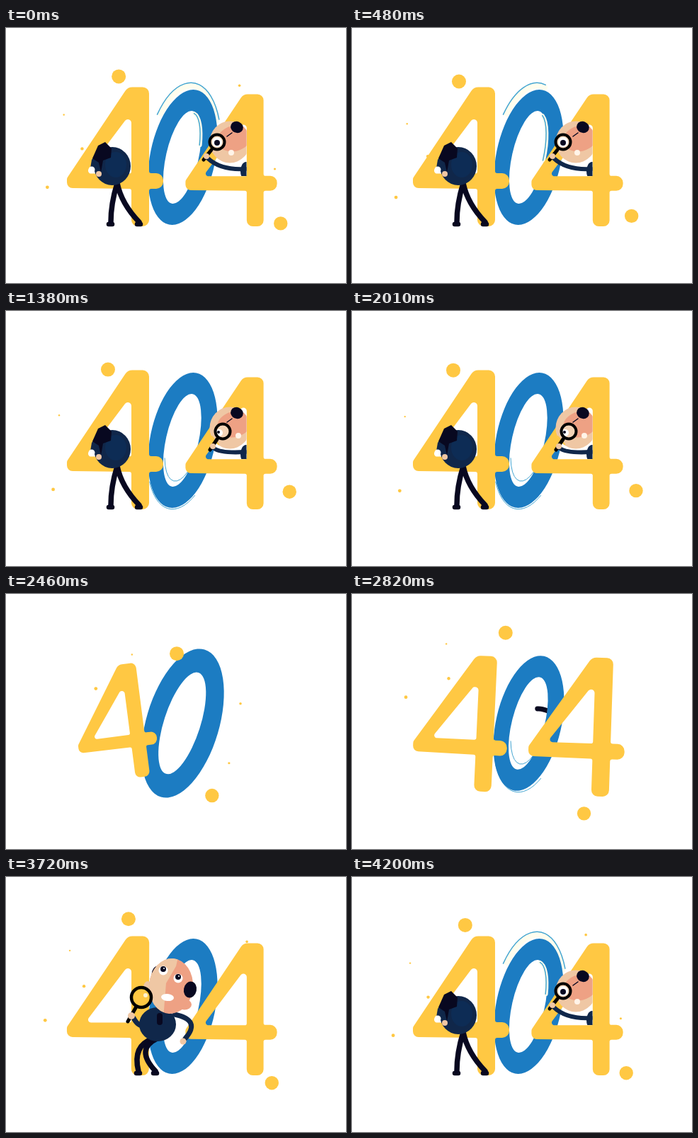
Recreate the animation shown at these times as an HTML page with a canvas. Size 480 px wide and 360 px high, loop 4230 ms.

```html
<!DOCTYPE html>
<html lang="en">
<head>
<meta charset="utf-8">
<title>404</title>
<style>
html, body { margin: 0; width: 100%; height: 100%; overflow: hidden; background: #fff; }
canvas { display: block; }
</style>
</head>
<body>
<canvas id="stage" width="480" height="360"></canvas>
<script>
const c = document.getElementById('stage').getContext('2d');
const LOOP = 4230, START = 2130;
const YELLOW = '#ffc843', BLUE = '#1c7cc2', NAVY = '#10274a', DARK = '#080820',
      PALE = '#efc7a4', SALMON = '#eea184', GLINT = '#45a6d2', CREAM = '#fffdee';

const clamp = v => Math.min(1, Math.max(0, v));
const mix = (a, b, p) => a + (b - a) * p;
const ease = (u, a, b) => { const p = clamp((u - a) / (b - a)); return p * p * (3 - 2 * p); };

function oval(x, y, rx, ry, color, turn = 0) {
  c.fillStyle = color;
  c.beginPath();
  c.ellipse(x, y, rx, ry, turn, 0, 7);
  c.fill();
}
const disc = (x, y, r, color) => oval(x, y, r, r, color);

function ring(x, y, r, w, color) {
  c.strokeStyle = color;
  c.lineWidth = w;
  c.beginPath();
  c.arc(x, y, r, 0, 7);
  c.stroke();
}

function shape(color, ...pts) {
  c.fillStyle = color;
  c.beginPath();
  pts.forEach(p => c.lineTo(...p));
  c.fill();
}

// Two points give a straight line, three a curve
function line(color, w, ...p) {
  c.strokeStyle = color;
  c.lineWidth = w;
  c.beginPath();
  c.moveTo(p[0], p[1]);
  if (p.length > 4) c.quadraticCurveTo(...p.slice(2));
  else c.lineTo(p[2], p[3]);
  c.stroke();
}

function clipped(path, draw) {
  c.save();
  c.beginPath();
  path();
  c.clip();
  draw();
  c.restore();
}

// Draws around (x, y) with a springy scale and a turn that settles
function pop(u, start, x, y, size, turn, draw) {
  const t = u - start;
  if (t <= 0) return;
  c.save();
  c.translate(x, y);
  c.rotate(turn(t) * Math.exp(-t / 300));
  const s = size * (1 - Math.exp(-t / 125) * Math.cos(t * Math.PI / 240));
  c.scale(s, s);
  draw();
  c.restore();
}

function roundPoly(path, pts) {
  const end = pts[pts.length - 1];
  path.moveTo((end[0] + pts[0][0]) / 2, (end[1] + pts[0][1]) / 2);
  pts.forEach(([x, y, r], i) => {
    const [nx, ny] = pts[(i + 1) % pts.length];
    path.arcTo(x, y, nx, ny, r);
  });
  path.closePath();
}

// The digit 4, centred on its own origin
const four = new Path2D();
roundPoly(four, [[18, -98.5, 12], [48, -98.5, 9], [48, 23, 3], [68, 23, 10], [68, 45, 10],
  [48, 45, 3], [48, 98, 9], [23, 98, 9], [23, 45, 3], [-68, 44, 8], [-68, 30, 6]]);
roundPoly(four, [[23, -63, 5], [23, 23.5, 3], [-42, 23.5, 4]]);

const drawFour = (u, start, x, y, size) =>
  pop(u, start, x, y, size, t => -.21 * Math.cos(t * Math.PI / 480), () => {
    c.fillStyle = YELLOW;
    c.fill(four, 'evenodd');
  });

function glint(rx, ry, turn, from, to, color = GLINT, w = 1.5) {
  c.strokeStyle = color;
  c.lineWidth = w;
  c.beginPath();
  c.ellipse(250, 182.5, rx, ry, turn, from, to);
  c.stroke();
}

function drawZero(u) {
  const upper = u > 1600 && u < 2900;
  const lower = u > 3000 || (u > 550 && u < 1000);
  const sweep = clamp((u - 2100) / 480);
  if (upper) {
    const end = mix(-.6, -1.4, sweep);
    glint(48, 102, .14, -2.55, end, CREAM, 8);
    glint(52, 106, .14, -2.6, end);
  }
  if (lower) glint(47, 99, .2, .83, 2.4, GLINT, 1);
  pop(u, 70, 249.5, 182.5, 1, () => .21, () => {
    c.fillStyle = BLUE;
    c.beginPath();
    c.ellipse(0, 0, 46, 97, .2, 0, 7);
    c.closePath();
    c.moveTo(0, 0);
    c.ellipse(-.7, 0, 23, 67, .223, 0, 7);
    c.fill('evenodd');
  });
  if (upper) {
    const from = mix(-1.5, -1.3, sweep), to = mix(-.35, 0, sweep);
    glint(21, 64, .223, from, to, CREAM, 5);
    glint(20, 64, .223, from, to);
  }
  if (lower) glint(23, 59, .223, .6, 2.6, GLINT, 1);
}

// All dots fly out of the centre and share one slowing turn.
// Each is: degrees left of straight up, distance, radius, last moment
const bigDots = [[0, 144, 10], [-164, 168, 9.7]];
const specks = [[64, 197, 2.4], [47, 143, 2.2], [32, 178, 1.2], [-78, 127, 1.8, 2400], [-137.5, 131, 1.6, 2400]];

function drawDots(list, u) {
  if (u < 150) return;
  const turn = 48 * (1 - Math.pow(1 - (u - 150) / 4080, 2.6));
  const reach = 1 - Math.exp(-u / 300);
  for (const [angle, far, r, until = LOOP] of list) {
    if (u > until) continue;
    const a = (angle + turn) * Math.PI / 180, d = far * reach;
    disc(250 - d * Math.sin(a), 180 - d * Math.cos(a), r, YELLOW);
  }
}

function drawLegs(p) {
  const leg = (a, b) => {
    const v = a.map((n, i) => mix(n, b[i], p));
    line(DARK, 7.5, ...v);
    line(DARK, 6.5, v[4] - 3, 277, v[4] + 2, 277);
  };
  leg([208, 228, 178, 238, 187, 274], [157, 219, 148, 248, 148, 274]);
  leg([213, 228, 182, 243, 211, 274], [157, 219, 163, 248, 188, 274]);
}

function drawHead() {
  oval(200, 156, 6, 9, PALE);
  oval(213, 135, 7, 9.5, DARK, .3);
  oval(252, 180, 10, 7.5, SALMON);
  clipped(() => c.ellipse(233, 154, 31, 39, .08, 0, 7), () => {
    c.fillStyle = SALMON;
    c.fillRect(190, 100, 90, 100);
    shape(PALE, [190, 100], [246, 100], [240, 126], [226, 150], [222, 200], [190, 200]);
  });
  oval(260, 159, 9, 11.5, DARK, .2);
  for (const [x, y] of [[222, 132], [243, 143]]) {
    disc(x, y, 6.5, '#fff');
    disc(x, y - 2, 4, DARK);
    disc(x + 1, y - 3, 1, '#fff');
  }
  oval(228, 170, 9, 5, '#fff', .1);
}

function drawLens() {
  line('#000', 5, 172, 204, 184, 183);
  disc(177, 196, 5, PALE);
  disc(191, 170, 14, YELLOW);
  ring(191, 170, 14, 4.5, '#000');
  disc(197, 167, 3, '#fff3d0');
}

// p moves the figure into the left digit, its head slipping behind the stem
function drawMan(p, dx) {
  const upper = draw => clipped(() => c.rect(mix(160, 177, p), 0, 480, 360), () => {
    c.translate(-100 * p, 0);
    draw();
  });
  c.save();
  c.translate(dx, 0);
  drawLegs(p);
  if (p < 1) upper(() => {
    line(NAVY, 7, 238, 194, 276, 202, 253, 228);
    disc(250, 232, 4.5, PALE);
    line(NAVY, 7, 198, 208, 188, 214, 180, 199);
  });
  oval(mix(214, 150, p), mix(208, 195, p), 26, mix(24, 27, p), NAVY);
  if (p < 1) upper(() => {
    drawHead();
    line(DARK, 8, 217, 196, 217, 205);
    drawLens();
  });
  if (p > .85) {
    oval(155, 193, 15, 18, '#0d2c55');
    shape(NAVY, [131, 172], [140, 172], [138, 204], [119, 198], [121, 186]);
    shape(DARK, [140, 161], [149, 170], [148, 183], [137, 187], [134, 204], [131, 190], [122, 184], [130, 166]);
    disc(121, 200, 4.5, '#fff');
    disc(131, 206, 4, PALE);
  }
  c.restore();
}

// Head and lens showing through the right-hand digit
function drawPeek(u) {
  const shown = ease(u, 1780, 2040);
  if (!shown) return;
  const q = ease(u, 2650, 3200);
  clipped(() => c.rect(240, 100, 99.5, 109), () => {
    c.translate(75 * (1 - shown), 0);
    const dy = 4 * q, lx = 298 + 8 * q, ly = 161 + 9 * q;
    const hx = 283 + 9 * q, hy = 183 + 10 * q;
    oval(339, 202, 8, 13, NAVY);
    clipped(() => c.ellipse(316, 161 + dy, 28.5, 29.5, 0, 0, 7), () => {
      c.fillStyle = PALE;
      c.fillRect(280, 120, 70, 80);
      oval(322, 156 + dy, 24, 18, SALMON, -.25);
      shape(YELLOW, [280, 175], [291, 176], [301, 188], [300, 200], [280, 200]);
    });
    line(NAVY, 6, hx + 2, hy + 1, 303, 201, 338, 199);
    oval(326, 140 + dy, 9, 8, DARK, .4);
    line(DARK, 1.5, 312, 153 + dy, 319, 148 + dy);
    disc(318 + 10 * q, 176, 4, '#fff4e8');
    line('#000', 5, lx - 8, ly + 11, hx - 4, hy + 3);
    disc(hx, hy - 2, 4, PALE);
    disc(lx, ly, 10.5, '#f3d3b6');
    disc(lx - 5 * q, ly + 2 * q, 7 - 2 * q, '#fff');
    disc(lx - 6 * q, ly + 1, 4 - 2 * q, DARK);
    ring(lx, ly, 10.5, 4, '#000');
  });
}

// While entering, the figure only shows through the ring and left of it
function drawEntry(u) {
  const dx = 115 * Math.pow(1 - clamp((u - 690) / 380), 2);
  const opening = () => {
    c.ellipse(249.5, 182.5, 23, 67, .223, 0, 7);
    c.rect(0, 0, 225, 360);
  };
  clipped(dx > 0 ? opening : () => c.rect(0, 0, 480, 360), () => {
    const x = 250 + Math.abs(u - 750) * .2;
    if (u < 900) line(DARK, 7, x, 162, x + 10, 161, x + 28, 172);
    if (u > 690) drawMan(ease(u, 1600, 1950), dx);
  });
}

function frame(now) {
  const u = (now % LOOP - START + LOOP) % LOOP;
  c.fillStyle = '#fff';
  c.fillRect(0, 0, 480, 360);
  c.lineCap = 'round';
  drawZero(u);
  drawDots(specks, u);
  drawFour(u, 240, 154, 182, 1);
  drawFour(u, 380, 318, 187, .95);
  if (u > 600) drawEntry(u);
  drawPeek(u);
  drawDots(bigDots, u);
  requestAnimationFrame(t => frame(Math.max(0, t - origin)));
}
const origin = performance.now();
frame(0);
</script>
</body>
</html>
```
